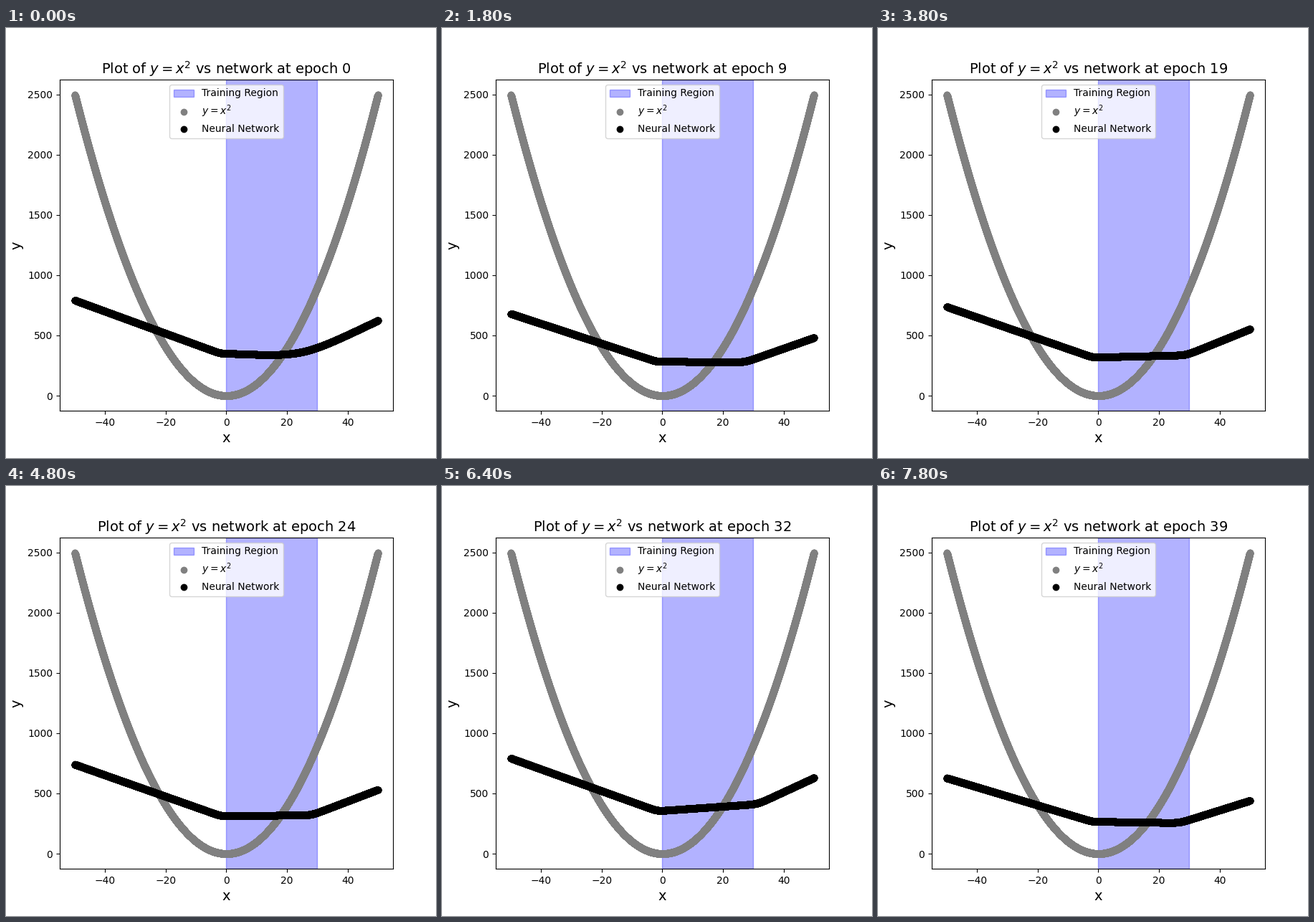
These frames come from a looping animation (600 px wide and 600 px high, 8 s). A matplotlib script:

```python
import numpy as np
import matplotlib.pyplot as plt
from matplotlib.animation import FuncAnimation

EPOCHS = 40
STEP_MS = 200

# Key epochs of the fit, then its left end, floor, floor tilt and right end
KEYS = [0, 5, 14, 19, 24, 32, 39]
LEFT = [792, 708, 647, 738, 741, 792, 628]
FLOOR = [351, 298, 267, 320, 315, 358, 267]
TILT = [-1.1, 0, -0.45, 0.6, 0.2, 1.75, -0.4]
RIGHT = [624, 507, 450, 553, 532, 630, 441]

x = np.linspace(-49.98, 49.99, 10000)


def soft_relu(z, width):
    return width * np.logaddexp(0, z / width)


def network(epoch):
    """Three sloped pieces joined by two rounded bends."""
    left, floor, tilt, right = (np.interp(epoch, KEYS, row)
                                for row in (LEFT, FLOOR, TILT, RIGHT))
    hinge = 27.5 + 2.2 * tilt
    fall = (left - floor) / 48
    rise = (right - floor - 50 * tilt) / (50 - hinge)
    width = 1 + 3.5 * np.exp(-epoch)  # the right bend sharpens at once
    return (floor + tilt * np.maximum(x, 0)
            + fall * soft_relu(-2 - x, 0.6)
            + rise * soft_relu(x - hinge, width))


def title_text(epoch):
    return f"Plot of $y=x^2$ vs network at epoch {epoch}"


fig, ax = plt.subplots(figsize=(6, 6), dpi=100)
ax.axvspan(0, 30, color="blue", alpha=0.3, label="Training Region")
ax.scatter(x, x**2, color="gray", label="$y=x^2$")
fit = ax.scatter(x, network(0), color="black", label="Neural Network")
ax.set_xlabel("x", fontsize=14)
ax.set_ylabel("y", fontsize=14)
title = ax.set_title(title_text(0), fontsize=14)
ax.legend(loc="upper center")


def update(epoch):
    fit.set_offsets(np.column_stack([x, network(epoch)]))
    title.set_text(title_text(epoch))
    return fit, title


anim = FuncAnimation(fig, update, frames=EPOCHS, interval=STEP_MS,
                     repeat=True, repeat_delay=0)
plt.show()
```
